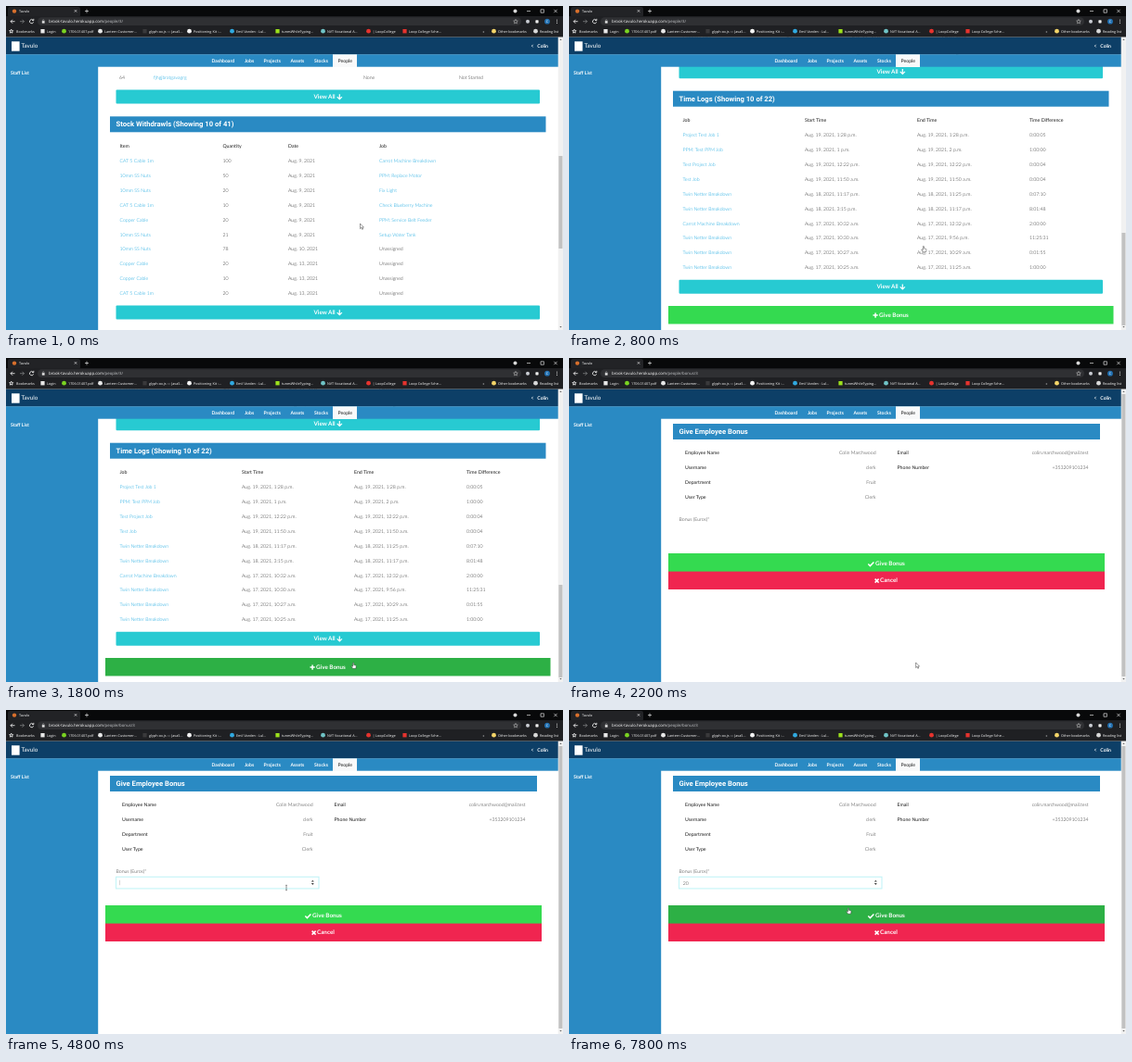
Write an HTML page that moves like this. It is 600 px wide and 350 px high and loops after 8000 ms.

```html
<!DOCTYPE html>
<html lang="en">
<head>
<meta charset="utf-8">
<title>Tavulo</title>
<style>
  html, body { margin: 0; width: 100%; height: 100%; overflow: hidden; background: #fff; }
  svg { display: block; width: 600px; height: 350px; }
  text { font: 400 5.2px Lato, sans-serif; fill: #1c1c1c; text-rendering: geometricPrecision; white-space: pre; }
  .cell { font-weight: 300; fill: #222; }
  .link { font-weight: 300; fill: #009fdc; }
  .nav { font-weight: 700; font-size: 5.1px; fill: #fff; }
  .title { font: 700 7.65px Roboto, sans-serif; fill: #fff; }
  .button { font-weight: 700; font-size: 6.3px; fill: #fff; }
  .brand { font-size: 6.3px; fill: #fff; }
  .chrome { font: 400 3.75px "Open Sans", sans-serif; fill: #fff; }
  .url { font: 400 4.35px "Open Sans", sans-serif; fill: #fff; }
</style>
</head>
<body>
<svg id="stage" viewBox="0 0 600 350"></svg>
<script>
const LOOP = 8000, STEP = 200;
const BLUE = '#2a8ac3', TEAL = '#27cad2', TEAL_DARK = '#21adb3';
const GREEN = '#34da50', GREEN_DARK = '#2db045', RED = '#f02550';

const rect = (x, y, w, h, fill, extra = '') =>
  `<rect x="${x}" y="${y}" width="${w}" height="${h}" fill="${fill}" ${extra}/>`;
const circle = (x, y, r, fill) => `<circle cx="${x}" cy="${y}" r="${r}" fill="${fill}"/>`;
const line = (d, color = '#fff', width = 0.7) =>
  `<path d="${d}" fill="none" stroke="${color}" stroke-width="${width}"/>`;
const text = (x, mid, label, cls = '', anchor = 'start') =>
  `<text x="${x}" y="${mid + 1.8}" class="${cls}" text-anchor="${anchor}">${label}</text>`;

const heading = (y, width, label) =>
  rect(112, y, width, 17, BLUE) + text(118.5, y + 9.2, label, 'title');

const viewAll = (y, id) =>
  rect(118.5, y, 456.5, 15, TEAL, `rx="1" id="${id}"`) +
  text(331.5, y + 7.9, 'View All', 'button') +
  line(`M359.3 ${y + 4.8}v5.2M356.7 ${y + 7.6}l2.6 2.6 2.6-2.6`, '#fff', 1.2);

const table = (top, columns, head, rows) =>
  head.map((label, i) => text(columns[i], top, label)).join('') +
  rows.map((row, r) => row.map((value, i) => {
    const linked = value !== 'Unassigned' && (i === 0 || head[i] === 'Job');
    return text(columns[i], top + 16.2 + r * 15.87, value, linked ? 'link' : 'cell');
  }).join('')).join('');

function browser() {
  const bookmarks = [
    [44, 'Login', '#e8e8e8'], [67, '1706.01407.pdf', '#7ad321'],
    [106, 'Lantern Customer...', '#e8e8e8'], [154, 'glyph-ox.js — JavaS...', '#3a3a3c'],
    [202, 'Positioning Kit -...', '#f4f4f4'], [248, 'Emil Varden - Lul...', '#30a9e0'],
    [297, 'tunesWhileTyping...', '#9be01c'], [346, 'NVT Vocational A...', '#6fc3c6'],
    [395, '| LoopCollege', '#e5332e'], [434, 'Loop College Sche...', '#e5332e'],
    [530, 'Other bookmarks', '#f3d468'], [575, 'Reading list', '#d8d8d8']];
  return rect(0, 0, 600, 11, '#08090a') + rect(2, 1, 78, 11, '#222326', 'rx="2"') +
    circle(9, 5.6, 2.2, '#d9702c') + text(14, 5.3, 'Tavulo', 'chrome') +
    line('M73.8 4.2l2.4 2.4m0-2.4l-2.4 2.4M85 5.5h4m-2-2v4', '#fff', 0.6) +
    circle(548.5, 5.5, 2, '#d8d8d8') +
    line('M561 5.5h4M576 3.8h3.4v3.4H576zM590.3 3.8l3.4 3.4m0-3.4l-3.4 3.4', '#fff', 0.6) +
    rect(0, 11, 600, 22.5, '#1f2023') + rect(34, 12.3, 521, 8.8, '#2f3033', 'rx="4.4"') +
    line('M9.5 16.7H5m2-2l-2 2 2 2', '#fff', 0.8) +
    line('M15 16.7h4.5m-2-2l2 2-2 2', '#8d8e90') +
    line('M29.2 15.3a2.1 2.1 0 1 0 .4 2M29.8 13.8v1.8H28', '#fff', 0.8) +
    rect(38.8, 16.2, 2.8, 2.4, '#e5e5e5') + line('M39.4 16.3v-.8a.8.8 0 0 1 1.6 0v.8', '#e5e5e5', 0.4) +
    '<text id="address" class="url" x="46" y="18.2"></text>' +
    line('M549 14.4l.7 1.5 1.6.2-1.2 1.1.3 1.6-1.4-.8-1.4.8.3-1.6-1.2-1.1 1.6-.2z', '#ddd', 0.5) +
    circle(562, 16.7, 2, '#c9ccd2') + rect(570.4, 15.2, 3.2, 3.2, '#eee', 'rx=".6"') +
    circle(583, 16.7, 2.9, '#2372b4') + text(583, 16.4, 'C', 'chrome', 'middle') +
    [15, 16.7, 18.4].map(y => circle(593.5, y, 0.5, '#eee')).join('') +
    line('M5.7 25.2l.6 1.3 1.4.2-1 1 .2 1.4-1.2-.7-1.2.7.2-1.4-1-1 1.4-.2z', '#f2f2f2', 0.9) +
    text(11, 26.9, 'Bookmarks', 'chrome') +
    bookmarks.map(([x, label, color], i) =>
      (i % 3 ? circle(x - 4.5, 27.2, 2.4, color) : rect(x - 6.6, 25, 4.2, 4.4, color)) +
      text(x, 26.9, label, 'chrome')).join('') +
    text(513.5, 26.7, '»', 'chrome');
}

function siteFrame() {
  const tabs = [[221.5, 'Dashboard'], [257, 'Jobs'], [277.5, 'Projects'], [306.5, 'Assets'], [332, 'Stocks']];
  return rect(0, 33.5, 595, 19, '#0d3f67') + rect(0, 52.3, 595, 13.4, BLUE) +
    rect(0, 65, 99.2, 285, BLUE) +
    rect(6, 38.3, 8.6, 10.4, '#fff') + text(16.5, 43.1, 'Tavulo', 'brand') +
    line('M567.6 41.8l-1.2 1.3 1.2 1.3', '#fff', 0.8) + text(584, 43, 'Colin', 'nav', 'end') +
    tabs.map(([x, label]) => text(x, 59, label, 'nav')).join('') +
    rect(352, 52.3, 26, 13.7, '#f8f9fa') + text(357.5, 59, 'People') +
    text(5, 72.5, 'Staff List', 'nav') +
    rect(594.7, 33.5, 5.3, 316.5, '#f1f1f1') + rect(595.4, 0, 4, 100, '#c1c1c1', 'id="thumb"') +
    '<path d="M596.3 37l1.2-1.5 1.2 1.5zM596.3 346l1.2 1.5 1.2-1.5z" fill="#666"/>';
}

function staffPage() {
  const cable = 'CAT 5 Cable 1m', nuts = '10mm SS Nuts', copper = 'Copper Cable';
  const netter = 'Twin Netter Breakdown', carrot = 'Carrot Machine Breakdown', none = 'Unassigned';
  const stock = [
    [cable, 100, 9, carrot], [nuts, 50, 9, 'PPM: Replace Motor'], [nuts, 20, 9, 'Fix Light'],
    [cable, 10, 9, 'Check Blueberry Machine'], [copper, 20, 9, 'PPM: Service Belt Feeder'],
    [nuts, 21, 9, 'Setup Water Tank'], [nuts, 78, 10, none], [copper, 20, 13, none],
    [copper, 10, 13, none], [cable, 20, 13, none]
  ].map(([item, count, day, job]) => [item, count, `Aug. ${day}, 2021`, job]);
  const logs = [
    ['Project Test Job 1', 19, '1:28 p', '1:28 p', '0:00:05'],
    ['PPM: Test PPM Job', 19, '1 p', '2 p', '1:00:00'],
    ['Test Project Job', 19, '12:22 p', '12:22 p', '0:00:04'],
    ['Test Job', 19, '11:50 a', '11:50 a', '0:00:04'],
    [netter, 18, '11:17 p', '11:25 p', '0:07:10'],
    [netter, 18, '3:15 p', '11:17 p', '8:01:48'],
    [carrot, 17, '10:32 a', '12:32 p', '2:00:00'],
    [netter, 17, '10:30 a', '9:56 p', '11:25:31'],
    [netter, 17, '10:27 a', '10:29 a', '0:01:55'],
    [netter, 17, '10:25 a', '11:25 a', '1:00:00']
  ].map(([job, day, from, to, span]) =>
    [job, ...[from, to].map(hour => `Aug. ${day}, 2021, ${hour}.m.`), span]);

  return text(122, 77, '64', 'cell') + text(159, 77, 'fjhgjbratgavagrg', 'link') +
    text(385, 77, 'None', 'cell') + text(488, 77, 'Not Started', 'cell') +
    viewAll(90.5, 'jobsButton') +
    heading(119.3, 469.5, 'Stock Withdrawls (Showing 10 of 41)') +
    table(151.2, [122.5, 233.5, 304, 402], ['Item', 'Quantity', 'Date', 'Job'], stock) +
    viewAll(323.5, 'stockButton') +
    heading(352, 469.5, 'Time Logs (Showing 10 of 22)') +
    table(383.6, [122.5, 254, 375, 496], ['Job', 'Start Time', 'End Time', 'Time Difference'], logs) +
    viewAll(556, 'logsButton') +
    rect(107, 584.3, 479.5, 19.5, GREEN, 'id="openBonus"') +
    line('M327.5 594.4h5.2m-2.6-2.6v5.2', '#fff', 1.5) + text(334, 594.4, 'Give Bonus', 'button');
}

function bonusPage() {
  const left = [['Employee Name', 'Colin Marchwood'], ['Username', 'clerk'], ['Department', 'Fruit'], ['User Type', 'Clerk']];
  const right = [['Email', 'colin.marchwood@mail.test'], ['Phone Number', '+353209101234']];
  const fields = (list, x, end) => list.map(([label, value], i) =>
    text(x, 102.5 + i * 15.87, label) + text(end, 102.5 + i * 15.87, value, 'cell', 'end')).join('');
  return heading(71, 460, 'Give Employee Bonus') +
    fields(left, 125, 330.5) + fields(right, 353.5, 559.5) +
    text(118.5, 174, 'Bonus (Euros)*', 'cell') +
    '<g id="field">' + rect(118.5, 180.3, 218.5, 12.6, '#fff', 'stroke="#c4f4f7" stroke-width="1.1"') +
    '<path d="M328.8 185.6l1.5-1.9 1.5 1.9zM328.8 187l1.5 1.9 1.5-1.9z" fill="#444"/>' +
    '<text id="amount" class="cell" x="122.8" y="188.5"></text>' +
    rect(122.6, 183.8, 0.3, 5.4, '#777', 'id="caret"') + '</g>' +
    rect(107, 211, 470, 20, GREEN, 'id="giveBonus"') +
    line('M322.3 222.5l2.1 2.1 4-4.2', '#fff', 1.5) + text(330, 222.3, 'Give Bonus', 'button') +
    rect(107, 230.6, 470, 19.4, RED) +
    line('M329.6 238.6l4 4m0-4l-4 4', '#fff', 1.5) + text(335, 240.5, 'Cancel', 'button');
}

const pointers = {
  arrow: '<path d="M0 0v5.6l1.3-1.2.9 2 .9-.4-.9-1.9h1.7z" fill="#fff" stroke="#222" stroke-width=".45"/>',
  hand: '<path d="M-.6 .4q.6-.8 1.1 0v2.2l2 .5q.6.2.5 1l-.4 2.4H-.5l-1.7-2.4q.1-.9 1-.3l.6.5z" fill="#fff" stroke="#222" stroke-width=".45"/>',
  beam: '<path d="M-1-2.7q.8 0 1 .4.2-.4 1-.4M0-2.3v4.6M-1 2.7q.8 0 1-.4.2.4 1 .4" fill="none" stroke="#333" stroke-width=".55"/>'
};

const stage = document.getElementById('stage');
stage.innerHTML = rect(0, 0, 600, 350, '#fff') +
  `<g id="staff">${staffPage()}</g><g id="bonus">${bonusPage()}</g>` +
  siteFrame() + browser() +
  Object.entries(pointers).map(([id, shape]) => `<g id="${id}">${shape}</g>`).join('');

const el = id => document.getElementById(id);
const set = (id, name, value) => el(id).setAttribute(name, value);
const show = (id, on) => set(id, 'display', on ? 'inline' : 'none');

// Linear interpolation over [time, value, value...] points.
function track(points, t) {
  const next = points.findIndex(p => p[0] > t);
  if (next < 0) return points[points.length - 1].slice(1);
  const a = points[next - 1], b = points[next], k = (t - a[0]) / (b[0] - a[0]);
  return a.slice(1).map((v, i) => v + (b[i + 1] - v) * k);
}

const scrollPath = [[0, 0], [200, 95], [400, 129.5], [600, 200], [800, 260.3]];
const mousePath = [
  [0, 381.5, 235], [400, 384, 236.5], [600, 384, 237], [1200, 377.8, 303.8], [1600, 374.5, 329],
  [2200, 373.6, 329], [2400, 360, 254], [2600, 345, 232], [3000, 317.5, 202],
  [3400, 306, 191], [3600, 306, 191], [4200, 302, 192], [6800, 302, 192],
  [7400, 301.5, 212], [7800, 301, 213.7]
];

function pointerKind(t) {
  if (t < 200) return 'arrow';
  if (t < 2000) return 'hand';
  if (t >= 2600 && t < 3000) return 'hand';
  if (t < 3400) return 'arrow';
  return t < 7200 ? 'beam' : 'hand';
}

function render(t) {
  const onStaff = t < 2000, [scroll] = track(scrollPath, t);
  show('staff', onStaff);
  show('bonus', !onStaff);
  set('staff', 'transform', `translate(0 ${-scroll})`);
  set('thumb', 'y', onStaff ? 162 + scroll * 0.319 : 39);
  set('thumb', 'height', onStaff ? 100 : 305);
  el('address').innerHTML = 'brook-tavulo.herokuapp.com<tspan fill="#c4c6c9">/people/' +
    (onStaff ? '3/' : 'bonus/3') + '</tspan>';

  set('stockButton', 'fill', t >= 200 && t < 600 ? TEAL_DARK : TEAL);
  set('openBonus', 'fill', t >= 1600 ? GREEN_DARK : GREEN);
  set('giveBonus', 'fill', (t >= 2600 && t < 3200) || t >= 7400 ? GREEN_DARK : GREEN);

  const amount = t < 5800 ? '' : t < 6200 ? '2' : '20';
  show('field', t >= 4800);
  el('amount').textContent = amount;
  set('caret', 'x', 122.6 + amount.length * 3.05);
  show('caret', t < 5400 || (t >= 5800 && t < 6600));

  const [x, y] = track(mousePath, t), kind = pointerKind(t);
  for (const id in pointers) show(id, id === kind);
  set(kind, 'transform', `translate(${x} ${y})`);
}

const start = performance.now();
function tick() {
  const t = (performance.now() - start) % LOOP;
  render(Math.floor(t / STEP) * STEP);
  requestAnimationFrame(tick);
}
render(0);
requestAnimationFrame(tick);
</script>
</body>
</html>
```
